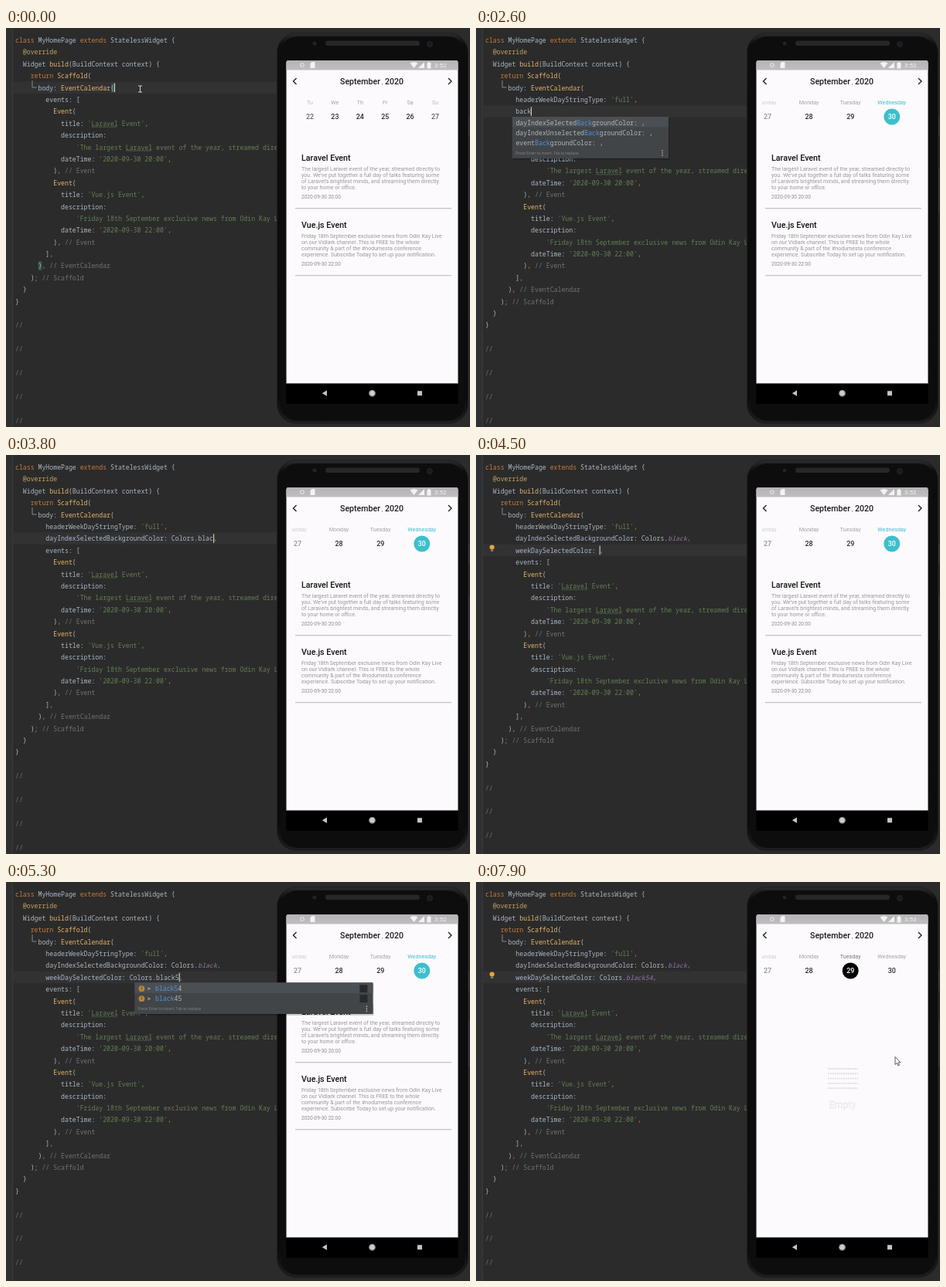
Write an HTML page that moves like this. It is 600 px wide and 517 px high and loops after 8000 ms.

```html
<!DOCTYPE html>
<html lang="en">
<head>
<meta charset="utf-8">
<title>Event calendar demo</title>
<style>
html, body { margin: 0; width: 100%; height: 100%; overflow: hidden; background: #2b2b2b; }
svg { display: block; width: 600px; height: 517px; }
text { white-space: pre; }
.code { font: 8.21px "Noto Sans Mono", "DejaVu Sans Mono", monospace; fill: #a9b7c6; }
.ui { font-family: Roboto, Arial, sans-serif; }
.hint { font: 5.2px Roboto, sans-serif; fill: #7c7f81; }
</style>
</head>
<body>
<svg id="stage" viewBox="0 0 600 517">
  <defs>
    <linearGradient id="rim" x2="0" y2="1">
      <stop offset="0" stop-color="#2c2c2d"/><stop offset=".03" stop-color="#0d0d0e"/>
      <stop offset=".93" stop-color="#0b0b0c"/><stop offset="1" stop-color="#1e1e1f"/>
    </linearGradient>
    <linearGradient id="status" x2="0" y2="1">
      <stop offset="0" stop-color="#b5b3b5"/><stop offset="1" stop-color="#c0bec0"/>
    </linearGradient>
    <clipPath id="strip"><rect x="370" y="86" width="208" height="44"/></clipPath>
  </defs>
  <rect width="600" height="517" fill="#2b2b2b"/>
  <rect width="8" height="517" fill="#2f3031"/>
  <path d="M8.5 0V517" stroke="#383939"/>
  <g id="editor"></g>
  <g id="body">
    <path d="M598 114v27M598 181v58" stroke="#454546" stroke-width="1.500"/>
    <rect x="350.500" y="6.500" width="247" height="506" rx="25" fill="url(#rim)" stroke="#1f1f20"/>
    <rect x="354.500" y="11" width="239" height="498" rx="22" fill="#0d0d0e"/>
    <rect x="413" y="16.500" width="122" height="6.500" rx="3.200" fill="#272728"/>
    <circle cx="399" cy="20" r="2.500" fill="#222326"/>
    <circle cx="548" cy="21" r="3.500" fill="#1a1b20" stroke="#242529"/>
    <path d="M362.500 461V45q0-3 3-3H581.500q3 0 3 3V461z" fill="#fcfafc"/>
    <path d="M362.500 54.500V45q0-3 3-3H581.500q3 0 3 3v9.500z" fill="url(#status)"/>
    <rect x="362.500" y="460.500" width="222" height="26.500"/>
    <path d="M415 469.500v7.500l-6.200-3.750z" fill="#c4c4c4"/>
    <circle cx="473.500" cy="473.300" r="3.800" fill="#cdcdcd" stroke="#858585" stroke-width="1.200"/>
    <rect x="532" y="470.300" width="6" height="6" fill="#c4c4c4"/>
    <circle cx="383" cy="48" r="2.300" fill="none" stroke="#e6e6e6" stroke-width="1.400" stroke-dasharray="1.400 .4"/>
    <path d="M393.500 46l2-2h4v8h-6zM522.500 45.500q5-3 10 0l-5 6.500zM533 52l8-8v8zM544.500 45h1.500v-1h2v1h1.500v7.500h-5z" fill="#f2f2f2"/>
    <path d="M375.500 65l-4 4 4 4M572 65l4 4-4 4" fill="none" stroke="#222" stroke-width="1.400"/>
  </g>
  <g id="phone" class="ui"></g>
  <g id="over"></g>
</svg>
<script>
const LOOP = 8000, CHAR = 4.93, LINE = 15.39, LEFT = 12;
const BLUE = '#5291de', TEAL = '#3dbfcd', PANEL = '#424548';
const $ = id => document.getElementById(id);

const head = `class MyHomePage extends StatelessWidget {
  @override
  Widget build(BuildContext context) {
    return Scaffold(
      body: EventCalendar(`.split('\n');
const tail = `        events: [
          Event(
            title: 'Laravel Event',
            description:
                'The largest Laravel event of the year, streamed directly to',
            dateTime: '2020-09-30 20:00',
          ), // Event
          Event(
            title: 'Vue.js Event',
            description:
                'Friday 18th September exclusive news from Odin Kay Live on',
            dateTime: '2020-09-30 22:00',
          ), // Event
        ],
      ), // EventCalendar
    ); // Scaffold
  }
}

//

//

//

//

//`.split('\n');

const finished = ["headerWeekDayStringType: 'full',",
  'dayIndexSelectedBackgroundColor: Colors.black,', 'weekDaySelectedColor: Colors.black54,'];

// start ms, inserted row, text already there, text typed, ms per letter, text after caret
const edits = [
  [300, 0, '', '', 1, ''],
  [400, 0, '', 'head', 90, ''],
  [850, 0, 'headerWeekDayStringType: ', '', 1, ','],
  [1350, 0, 'headerWeekDayStringType: ', "'full'", 75, ','],
  [2050, 1, '', '', 1, ''],
  [2200, 1, '', 'back', 100, ''],
  [2800, 1, 'dayIndexSelectedBackgroundColor: ', '', 1, ','],
  [3050, 1, 'dayIndexSelectedBackgroundColor: ', 'Colors.black', 72, ','],
  [4000, 2, '', 'week', 60, ''],
  [4270, 2, 'weekDaySelectedColor: ', '', 1, ','],
  [4560, 2, 'weekDaySelectedColor: ', 'Colors.black5', 55, ','],
  [5450, 2, 'weekDaySelectedColor: Colors.black54', '', 1, ',']
];

const pkg = (name, type = '') => `${type}(package:flutter/${name}.dart)`;
const blends = ['material', 'cupertino', 'painting', 'rendering', 'widgets']
  .map(n => ['BlendMode.color', pkg(n)]);
const lists = [
  { on: /^head$/, match: 'head', rows: [['headerMonthBackColor: ,'], ['headerMonthElevation: ,'], ['headerWeekDayStringType: ,']] },
  { on: /^back$/, match: 'Back', rows: [['dayIndexSelectedBackgroundColor: ,'], ['dayIndexUnselectedBackgroundColor: ,'], ['eventBackgroundColor: ,']] },
  { on: /^week$/, match: 'week', rows: [['weekDaySelectedColor: ,'], ['weekDayUnselectedColor: ,']] },
  { on: /^Colo?r?s?$/, match: /color/i, icons: true, rows: [
    ['Color', pkg('material'), 1], ['Color(int value)', pkg('material', 'Color ')], ...blends,
    ['BlendMode.color', '(dart:ui)'], ['Colors.transparent', 'Color (package:flutter/material.da…', 2],
    ['Colors', pkg('material'), 1], ['Color.fromARGB(…', pkg('material', 'Color ')]] },
  { on: /black5$/, match: /black5?/, icons: true, swatch: true, skip: 7,
    rows: [['black54', '', 2], ['black45', '', 2]] }
];

const rect = (x, y, w, h, fill, more = '') => `<rect x="${x}" y="${y}" width="${w}" height="${h}" fill="${fill}" ${more}/>`;
const code = (x, y, s, more = '') => `<text class="code" x="${x}" y="${y}" ${more}>${s}</text>`;
const ui = (x, y, size, fill, s, more = '') => `<text x="${x}" y="${y}" font-size="${size}" fill="${fill}" ${more}>${s}</text>`;
const mid = 'text-anchor="middle"';
const rowTop = i => 8 + i * LINE;

const syntax = /(\/\/.*)|('[^']*'?)|(@\w+)|(\b(?:class|extends|return)\b|[,;])|(\w+(?=\())|((?<=Colors\.)black(?:54)?\b)/g;
const inks = ['#707274', '#637f55', '#c4a262', '#c67a3a', '#e6b56c', '#9876aa'];
const paint = s => s.replace(syntax, (m, ...groups) => {
  const i = groups.slice(0, 6).findIndex(Boolean);
  return `<tspan fill="${inks[i]}"${i === 5 ? ' font-style="italic"' : ''}>${m}</tspan>`;
});

function typing(t) {
  const edit = edits.filter(e => e[0] <= t).pop();
  if (!edit) return { added: [], row: 4, col: head[4].length, typed: '', start: 0 };
  const [at, row, base, text, step, after] = edit;
  const typed = text.slice(0, Math.floor((t - at) / step) + 1);
  return { added: [...finished.slice(0, row), base + typed + after],
    row: 5 + row, col: 8 + base.length + typed.length, typed, start: 8 + base.length };
}

function drawEditor(t, s) {
  const lines = [...head, ...s.added.map(l => '        ' + l), ...tail];
  let out = rect(9, rowTop(s.row), 342, LINE, '#323233');
  if (!s.added.length) out += rect(136, 71.5, 5, 12, '#3b514d') + rect(41.5, 302, 5, 12, '#3b514d');
  lines.forEach((line, i) => {
    const y = +(19 + i * LINE).toFixed(1);
    out += code(LEFT, y, paint(line));
    const typo = line.indexOf('Laravel');
    if (typo > 0) out += `<path d="M${LEFT + typo * CHAR} ${y + 2}${'l1.5 -1l1.5 1'.repeat(11)}" fill="none" stroke="#587a52" stroke-width=".7"/>`;
  });
  out += '<path d="M34 68v9h5.500" fill="none" stroke="#85888a"/>';
  if (t < 5700) out += rect(LEFT + s.col * CHAR - .3, rowTop(s.row) + 2, 1.1, 11.5, '#d5d5d5');
  if (t > 5800 || t > 4400 && t < 4560) out +=
    '<circle cx="20.700" cy="119.500" r="3.100" fill="#eaa437"/><path d="M19.200 124h3" stroke="#999" stroke-width="1.500"/>';
  return out;
}

function drawPopup(s) {
  const list = lists.find(l => l.on.test(s.typed));
  if (!list) return '';
  const { rows, icons, swatch, match, skip = 0 } = list;
  const long = rows.length > 9;
  const tx = LEFT + (s.start + skip) * CHAR - (icons ? 1.5 : 0);
  const x = tx - (icons ? 26.5 : 4.5), y = rowTop(s.row) + LINE - .7;
  const w = icons ? 308 : 202, h = rows.length * 13 + (long ? 18.5 : 14.5);
  let out = rect(x + 1, y + 2, w, h, '#000', 'opacity=".2"') + rect(x, y, w, h, PANEL)
    + rect(x, y, w, 13.5, '#4a4f53');
  rows.forEach(([name, info = '', kind = 0], i) => {
    const cy = y + 7.8 + i * 13;
    if (icons) out += `<circle cx="${x + 9}" cy="${cy}" r="3.900" fill="${kind === 1 ? '#4389ad' : '#b98339'}"/>`
      + ui(x + 9, cy + 2.1, 6, PANEL, kind === 1 ? 'C' : 'f', mid + ' class="ui"');
    if (kind === 2) out += `<path d="M${x + 17} ${cy - 2}l4 2-4 2z" fill="#87999e"/>`;
    out += code(tx, cy + 2.8, name.replace(match, m => `<tspan fill="${BLUE}">${m}</tspan>`), 'style="fill:#b2b5b7"');
    if (info) out += code(x + w - 5, cy + 2.8, info, 'text-anchor="end" style="fill:#929598"');
    if (swatch) out += rect(x + w - 17, cy - 5, 10, 10, '#27292a');
  });
  if (long) out += code(tx, y + 153, 'Color.fromRGBO(…', `style="fill:${BLUE}" opacity=".6"`);
  const fy = y + h - 6.5;
  out += rect(x, fy - 6, w, 12.5, PANEL)
    + `<text class="hint" x="${x + 4}" y="${fy + 2}">Press Enter to insert, Tab to replace</text>`;
  for (const d of [-3, 0, 3]) out += `<circle cx="${x + w - 8}" cy="${fy + d}" r=".8" fill="#c5c7c8"/>`;
  return out;
}

function drawStrip(t) {
  const full = t >= 1900, black = t >= 6400, pick = t >= 7300 ? 2 : 3;
  const days = full ? ['Sunday', 'Monday', 'Tuesday', 'Wednesday'] : ['Tu', 'We', 'Th', 'Fr', 'Sa', 'Su'];
  const x0 = full ? 377 : 393, gap = full ? 53.6 : 32.4, first = full ? 27 : 22;
  return '<g clip-path="url(#strip)">' + days.map((day, i) => {
    const x = x0 + gap * i, on = full && i === pick;
    const edge = i === 0 ? (full ? .5 : .7) : i === 5 ? .75 : 1;
    const label = on ? (black ? '#757475' : TEAL) : '#a3a1a3';
    return `<g opacity="${edge}">` + (on ? `<circle cx="${x}" cy="115" r="10.500" fill="${black ? '#000' : TEAL}"/>` : '')
      + ui(x, 98.6, 7.2, label, day, mid)
      + ui(x, 118.2, 8.9, on ? '#fff' : '#29282a', first + i, mid + ' font-weight="500"') + '</g>';
  }).join('') + '</g>';
}

const events = [
  [171.5, 'Laravel Event', '2020-09-30 20:00', [
    'The largest Laravel event of the year, streamed directly to',
    "you. We've put together a full day of talks featuring some",
    "of Laravel's brightest minds, and streaming them directly", 'to your home or office.']],
  [258.5, 'Vue.js Event', '2020-09-30 22:00', [
    'Friday 18th September exclusive news from Odin Kay Live',
    'on our Vidlark channel. This is FREE to the whole',
    'community &amp; part of the #nodumesta conference',
    'experience. Subscribe Today to set up your notification.']]
];

const drawEvents = () => events.map(([y, title, date, text]) =>
  rect(374, y + 61.5, 202, 1, '#c6c4c6') + rect(374, y + 62.5, 202, 1, '#ebe9eb')
  + ui(382, y, 10.7, '#151515', title, 'font-weight="500"')
  + text.map((l, i) => ui(382, y + 13.4 + i * 8, 7.1, '#99979a', l)).join('')
  + ui(382, y + 49, 6.55, '#8d8b8e', date)).join('');

function drawEmpty(t) {
  const show = Math.min(1, Math.max(0, (t - 7500) / 600));
  let out = `<g opacity="${show.toFixed(2)}" fill="none" stroke="#cfcdcf" stroke-width="1.900">`;
  for (let i = 0; i < 5; i++) out += `<path d="M455 ${242 + i * 6.3}h39" stroke-dasharray="1.800 1.100"/>`;
  return out + ui(474, 292.5, 12.5, 'none', 'Empty', mid + ' stroke-width=".4"') + '</g>';
}

function drawPhone(t) {
  return ui(554, 51.3, 8, '#f6f6f6', t < 6600 ? '3:52' : '3:53')
    + ui(432, 73, 10.6, '#1d1c1d', 'September', 'font-weight="500"') + ui(486, 73, 7, '#555', ',')
    + ui(490, 73, 10.6, '#1d1c1d', '2020', 'font-weight="500"')
    + drawStrip(t) + (t < 7350 ? drawEvents() : drawEmpty(t));
}

// pointer stops: ms, x, y
const stops = [[6400, 330, 250], [7150, 484, 117], [7380, 484, 117], [7850, 542, 226.5]];
function drawPointer(t) {
  if (t < 350) return '<path d="M171 75h5M171 83h5M173.500 75v8" stroke="#d0d0d0" fill="none"/>';
  if (t < stops[0][0]) return '';
  const i = stops.findIndex(s => s[0] > t);
  let [, x, y] = stops[stops.length - 1];
  if (i > 0) {
    const [a, ax, ay] = stops[i - 1], [b, bx, by] = stops[i];
    const p = (t - a) / (b - a), k = p * p * (3 - 2 * p);
    x = ax + (bx - ax) * k;
    y = ay + (by - ay) * k;
  }
  return `<path transform="translate(${x.toFixed(1)} ${y.toFixed(1)})" d="M0 0v10l2.300-2 1.700 3.500 1.500-.7-1.600-3.400h3z" fill="#fff" stroke="#333" stroke-width=".8"/>`;
}

const shown = {};
function put(id, html) {
  if (shown[id] !== html) $(id).innerHTML = shown[id] = html;
}

const begin = performance.now();
function frame() {
  const t = (performance.now() - begin) % LOOP, s = typing(t);
  put('editor', drawEditor(t, s));
  put('phone', drawPhone(t));
  put('over', drawPopup(s) + drawPointer(t));
  requestAnimationFrame(frame);
}
frame();
</script>
</body>
</html>
```
